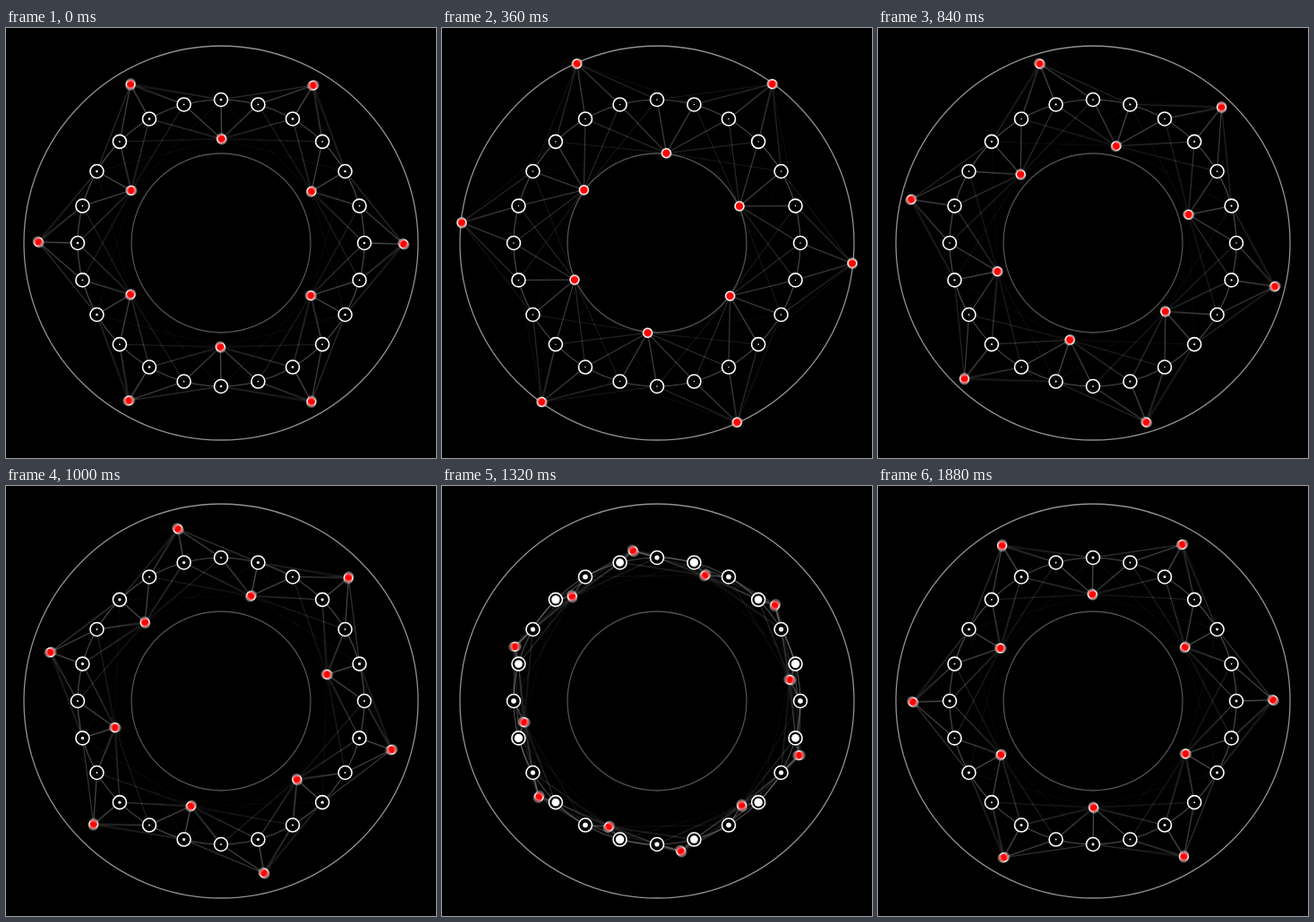
These frames come from a looping animation (480x480 px, 1.92 s). An HTML page with a canvas:

```html
<!DOCTYPE html>
<html lang="en">
<head>
<meta charset="utf-8">
<title>Orbit web</title>
<style>
html, body { margin: 0; width: 100%; height: 100%; overflow: hidden; background: #000; }
canvas { display: block; width: 480px; height: 480px; }
</style>
</head>
<body>
<canvas id="stage" width="480" height="480"></canvas>
<script>
const SIZE = 480, MID = 240, TAU = Math.PI * 2;
const LOOP = 1920, STEP = 40, SAMPLES = 8;
const RING = 160, SWING = 60, REACH = 160;

const view = document.getElementById('stage').getContext('2d');
const layer = document.createElement('canvas');
layer.width = layer.height = SIZE;
const g = layer.getContext('2d');

const polar = (r, a) => ({ x: MID + r * Math.cos(a), y: MID + r * Math.sin(a) });
const nodes = Array.from({ length: 24 }, (_, i) => polar(RING, i * TAU / 24));

function circle(x, y, r, fill, stroke, width) {
  g.beginPath();
  g.arc(x, y, r, 0, TAU);
  if (fill) { g.fillStyle = fill; g.fill(); }
  if (stroke) { g.strokeStyle = stroke; g.lineWidth = width; g.stroke(); }
}

// Alternate movers swing in and out of the ring while all of them turn
function moversAt(ms) {
  const turn = ms / LOOP * TAU / 12;
  const swing = SWING * Math.cos(Math.PI * (ms / LOOP - 0.25));
  return Array.from({ length: 12 }, (_, i) =>
    polar(RING + (i % 2 ? -swing : swing), turn + i * TAU / 12));
}

function drawScene(ms) {
  const movers = moversAt(ms);
  g.fillStyle = '#000';
  g.fillRect(0, 0, SIZE, SIZE);

  circle(MID, MID, RING + SWING, null, '#909090', 1.3);
  circle(MID, MID, RING, null, '#484848', 1.2);
  circle(MID, MID, RING - SWING, null, '#505050', 1.3);

  g.lineWidth = 1.3;
  const nearest = nodes.map(n => {
    let min = REACH;
    for (const m of movers) {
      const d = Math.hypot(m.x - n.x, m.y - n.y);
      min = Math.min(min, d);
      if (d >= REACH) continue;
      g.strokeStyle = `rgba(255,255,255,${0.42 * (1 - d / REACH)})`;
      g.beginPath();
      g.moveTo(m.x, m.y);
      g.lineTo(n.x, n.y);
      g.stroke();
    }
    return min;
  });

  nodes.forEach((n, i) => {
    circle(n.x, n.y, 7.5, '#000', '#fff', 1.6);
    circle(n.x, n.y, 4.3 * Math.pow(20 / nearest[i], 1.5), '#fff');
  });
  for (const m of movers) circle(m.x, m.y, 5, '#f00', '#fff', 1.6);
}

// Average several moments for motion blur
function render(start) {
  for (let i = 0; i < SAMPLES; i++) {
    drawScene(start + (i + 0.5) / SAMPLES * STEP);
    view.globalAlpha = 1 / (i + 1);
    view.drawImage(layer, 0, 0);
  }
}

let shown = -1;
function tick() {
  const step = Math.floor(performance.now() % LOOP / STEP);
  if (step !== shown) render((shown = step) * STEP);
  requestAnimationFrame(tick);
}
tick();
</script>
</body>
</html>
```
